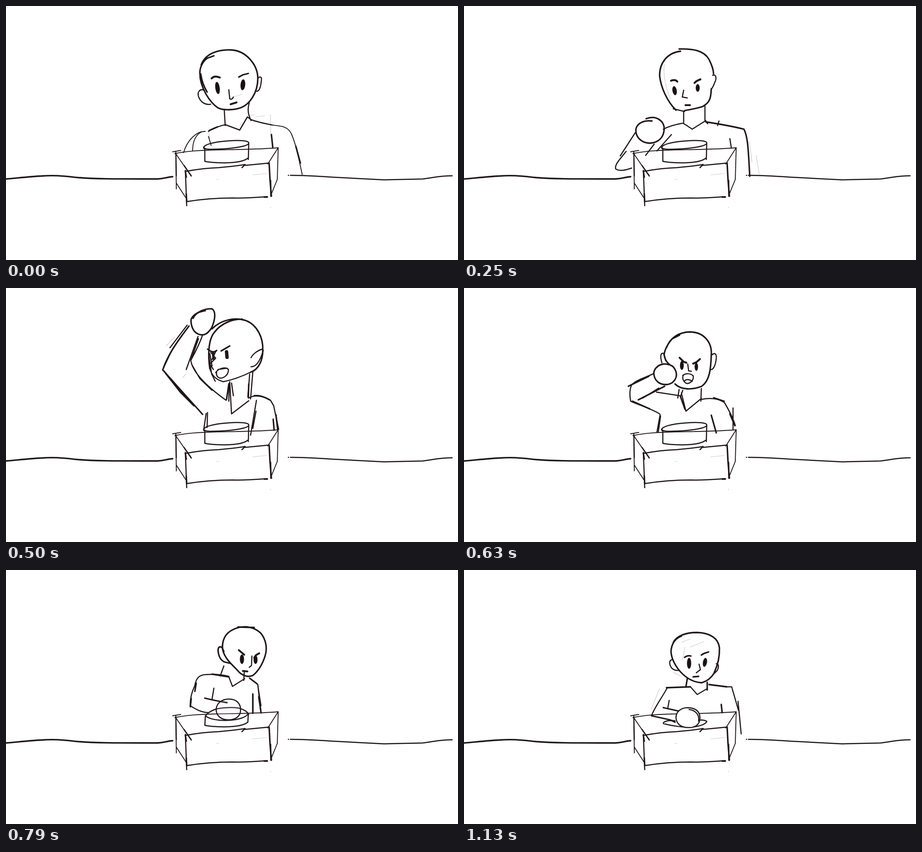
Recreate the animation shown at these times as an HTML page. Size 998 px wide and 561 px high, loop 1.71 s.

```html
<!DOCTYPE html>
<html lang="en">
<head>
<meta charset="utf-8">
<title>Fist on the table</title>
<style>
html, body { margin: 0; width: 100%; height: 100%; overflow: hidden; background: #fff; }
svg { display: block; width: 998px; height: 561px; overflow: hidden; }
path { fill: none; stroke: #1f151a; stroke-width: 2.5; stroke-linecap: round; stroke-linejoin: round; }
.thin { stroke-width: 1.9; }
.bold { stroke-width: 3.3; }
.thick { stroke-width: 4.2; }
.faint { stroke-width: 1.2; opacity: .22; }
.fist { fill: #fff; }
.clear { fill: #e4e4f6; fill-opacity: .15; }
ellipse { fill: #1a1115; }
/* Poses lie side by side; the strip jumps from one to the next. */
.strip { animation: poses 1710ms step-end infinite; }
@keyframes poses {
  0% { transform: translateX(0); }
  7.6% { transform: translateX(-998px); }
  14.61% { transform: translateX(-1996px); }
  22.22% { transform: translateX(-2994px); }
  29.23% { transform: translateX(-3992px); }
  36.84% { transform: translateX(-4990px); }
  41.52% { transform: translateX(-5988px); }
  46.19% { transform: translateX(-6986px); }
  48.53% { transform: translateX(-7984px); }
  51.16% { transform: translateX(-8982px); }
  53.8% { transform: translateX(-9980px); }
  56.14% { transform: translateX(-10978px); }
  60.81% { transform: translateX(-11976px); }
  66.08%, 100% { transform: translateX(-12974px); }
}
</style>
</head>
<body>
<svg viewBox="0 0 998 561">
<defs>
  <g id="cake">
    <path d="M437 315C433 306 460 300 490 298C515 296 537 297 536 303C535 310 500 315 470 316C450 317 438 317 436 312M439 314V343M536 303L535 339M439 343C450 346 480 347 495 346C515 345 528 341 534 336"/>
  </g>
  <g id="squashed">
    <path d="M440 328C438 320 450 312 464 307C480 304 500 303 514 305C525 308 533 313 536 319M440 322C450 330 470 333 490 332C515 331 530 325 534 318M440 325L439 343C450 346 480 347 495 346C515 345 528 341 534 336L535 318"/>
  </g>
  <g id="flat">
    <path d="M466 333C450 331 440 335 440 339C460 345 490 348 500 347C520 346 535 340 536 334C530 331 523 331 518 332"/>
  </g>

  <g id="head-calm">
    <path class="bold" d="M431 130C440 105 468 96 496 97C530 98 556 130 556 160C556 195 535 218 520 224C505 230 480 231 468 225C450 213 428 180 428 148C428 138 432 124 445 115L459 110M430 150C432 166 437 178 444 190"/>
    <path d="M438 186C428 182 422 190 425 200C430 213 440 219 452 217M556 160C560 155 565 156 564 163C563 175 560 190 553 188M492 185L494 205C497 207 500 206 502 201"/>
    <path class="thick" d="M454 160C458 155 465 155 472 158M496 217L509 213"/>
    <path class="bold" d="M514 157L523 152L535 149"/>
    <ellipse cx="467" cy="181" rx="4.9" ry="13.5" transform="rotate(-8 467 181)"/>
    <ellipse cx="523" cy="174" rx="5.2" ry="12" transform="rotate(5 523 174)"/>
  </g>
  <g id="head-stern">
    <path class="bold" d="M478 100C450 103 431 125 432 155C435 180 448 210 468 230M487 231C504 228 515 226 527 222C545 212 545 200 546 183M551 150C551 140 547 130 541 118C530 98 505 94 475 95"/>
    <path d="M549 153C557 150 558 160 554 168C551 176 549 180 546 184M485 186L482 201L493 203M462 227L487 233"/>
    <path class="faint" d="M442 128C440 150 443 175 456 205"/>
    <path class="thick" d="M457 165C463 163 468 163 471 167M509 170C514 164 518 164 522 162M489 219H499"/>
    <ellipse cx="465" cy="187" rx="4.8" ry="10" transform="rotate(-10 465 187)"/>
    <ellipse cx="516" cy="181" rx="4.4" ry="8.5"/>
  </g>
  <g id="head-shout">
    <path class="bold" d="M455 90C475 70 505 64 530 72C555 82 568 110 567 137C567 160 558 180 540 186M450 178C446 150 446 115 460 98C475 78 500 68 522 69"/>
    <path d="M542 185C522 195 500 203 480 207C465 203 455 195 450 178M566 135C555 138 545 146 541 154M541 174C552 174 560 164 568 138M462 156L450 168L458 180M448 150L454 190L462 206M463 187C470 176 485 174 491 180C492 192 480 200 472 199C466 197 464 192 465 186M468 180L488 177M452 142L463 155M464 138L455 158M450 145L455 172"/>
    <path class="bold" d="M445 135C455 142 460 143 465 138M475 139L494 128"/>
    <path d="M487 141L488 153" style="stroke-width:7.5"/>
    <path d="M457 142L458 156" style="stroke-width:5"/>
  </g>
  <g id="head-low">
    <path class="bold" d="M478 170C478 150 488 135 510 128C530 122 550 127 563 140C575 155 577 175 572 190C565 212 555 225 545 233C535 237 525 235 515 226C505 214 495 207 487 195C480 185 477 175 478 165M512 126L548 127"/>
    <path class="bold" d="M481 180L477 171C469 167 467 174 469 184C471 194 475 200 482 203L494 206"/>
    <path d="M543 190L542 211L537 215"/>
    <path class="thick" d="M514 177L526 187M548 194L552 188L559 184M523 223L533 224"/>
    <ellipse cx="521" cy="197" rx="4.6" ry="10.5"/>
    <ellipse cx="551" cy="198" rx="4.4" ry="9.5"/>
  </g>
  <g id="head-eased">
    <path class="bold" d="M497 150C510 140 530 136 548 138C575 142 590 160 588 182C585 200 572 212 562 222C550 235 543 243 533 244C520 240 510 225 497 205C488 190 482 178 483 165C485 155 495 147 510 144"/>
    <path d="M486 185C480 195 482 205 490 212L498 214M543 197L541 220L535 221"/>
    <path class="bold" d="M518 191C522 186 527 186 531 190M552 191L565 187M526 227L534 231"/>
    <ellipse cx="525" cy="205" rx="4.4" ry="9.5" transform="rotate(8 525 205)"/>
    <ellipse cx="556" cy="205" rx="4.2" ry="8.5" transform="rotate(8 556 205)"/>
  </g>
  <g id="head-still">
    <path class="bold" d="M462 160C470 145 490 138 515 138C545 139 562 152 564 172C565 195 558 215 552 228C545 240 535 246 525 249C505 248 490 238 478 225C465 210 458 195 457 180C458 165 465 152 480 146"/>
    <path d="M461 198C452 198 453 208 458 216C463 222 470 222 475 222M557 207C563 207 563 215 559 222L550 231M519 208L522 220L513 227"/>
    <path class="bold" d="M487 193C492 189 497 189 501 190M524 188C530 183 535 183 540 181M506 236L518 235"/>
    <ellipse cx="497" cy="206" rx="4.7" ry="12"/>
    <ellipse cx="532" cy="204" rx="4.5" ry="10" transform="rotate(10 532 204)"/>
  </g>

  <g id="body-stern">
    <path d="M485 233V260M532 221V253L538 260M484 259L504 272L534 253M482 259C465 262 450 267 440 272M560 264L563 254M587 293L590 312"/>
    <path class="bold" d="M534 256C560 260 590 265 618 272C628 290 628 330 631 376"/>
    <path class="faint" d="M630 300L636 345M645 330L652 372"/>
  </g>
  <g id="body-shout">
    <path d="M493 210L492 250M498 210L502 238M538 190L534 240M545 185L540 245M494 207L498 278L536 249M536 243C550 234 570 240 584 248L591 260L602 312M553 248L540 325M552 272L545 310M442 277L437 310M445 275L444 308"/>
    <path class="bold" d="M590 290L592 314M596 280L600 313M492 212L487 246M536 212L535 242M548 238C560 236 572 241 582 247"/>
  </g>
  <g id="body-low">
    <path d="M481 212L473 234M526 226L525 244M492 236L500 257L527 240M538 239L556 253L560 290L563 316M545 273V317M556 255L563 300M492 235C475 230 455 230 440 231C428 232 420 237 417 255C410 270 406 285 407 300"/>
    <path class="bold" d="M420 250L417 268M409 284L407 302M545 275V315M558 280L563 314M455 230L492 236M538 239L554 251"/>
  </g>
  <g id="body-eased">
    <path class="bold" d="M501 219L499 240M435 246L500 244M538 248L562 250M565 263L576 306M433 298L457 299L484 306M436 246C425 270 415 290 412 312"/>
    <path d="M533 240V250M499 243L512 263L522 250L538 247M562 250L577 308M557 262L549 315M555 280L552 300M459 272C455 280 452 290 453 296M415 316C430 318 450 325 466 328"/>
    <path class="clear" d="M467 326C466 312 480 306 494 306C512 306 521 314 521 325C521 337 510 344 494 343C478 344 468 338 467 326Z"/>
  </g>
  <g id="body-still">
    <path class="bold" d="M493 240L490 258M537 248V265M447 260L500 258M541 253L580 258M568 297L570 315M440 304L476 312M414 322L455 331L466 336"/>
    <path d="M500 258L515 275L537 262M449 260C435 285 420 305 414 322M580 258L591 258L606 310M605 290L608 320L612 362M453 288L450 305"/>
    <path class="faint" d="M432 262L413 308"/>
    <path class="fist" d="M468 326C468 312 480 304 495 304C512 305 521 313 521 327C521 341 510 349 495 348C479 348 469 340 468 326Z"/>
    <path d="M497 308C512 310 520 320 518 334"/>
  </g>
</defs>

<!-- Table and box -->
<path class="bold" d="M0 382C25 380 50 377 78 375.5C110 373 130 376 160 379C200 382 240 382 300 382H335C350 381 355 378 368 377"/>
<path d="M628 374C660 374 690 376 720 378C760 380 800 382 835 384C870 383 895 383 920 382C945 379 955 375 985 375M623.5 374H624"/>
<path class="thin" d="M373 326C400 320 430 319 460 318C500 317 560 317 601 313M375 321L376 404M374 325L396 357L409 376M601 313L578 349M601 313L599 383L586 415M376 391L398 425M368 322L386 319"/>
<path d="M398 365C420 361 440 358 470 357C500 354 520 352 528 350L521 357M528 352L580 347M396 363L399 441M399 432C430 427 470 424 500 424C530 425 550 423 577 421M375 326L376 375M393 352L409 375"/>
<path class="bold" d="M581 347L583 385L586 420M396 365L398 378M570 422H577M398 415L399 432M584 385L585 420"/>
<path class="faint" d="M584 444V446M465 383H470M545 373L575 370"/>

<g class="strip">
  <g>
    <use href="#cake"/><use href="#head-calm"/>
    <path d="M482 231L484 264M537 214C532 232 536 242 541 253M484 262L516 274L533 245L541 251C560 258 575 260 588 263M484 262C470 266 455 270 447 277"/>
    <path class="thin" d="M588 263C608 265 622 266 630 282C640 305 645 330 654 372M440 277C420 276 400 297 392 324M432 278C418 285 412 300 412 320M447 288L453 308"/>
    <path class="bold" d="M449 275L467 267M586 284L589 312M640 310L650 347"/>
    <path class="faint" d="M538 243L548 240M553 245L572 242M584 240V282M447 272L450 300M505 200L522 195"/>
  </g>

  <g transform="translate(998)">
    <use href="#cake"/><use href="#head-stern" y="3"/><use href="#body-stern"/>
    <path d="M440 272C405 276 370 300 335 344M428 312C400 325 375 348 336 372"/>
    <path class="fist bold" d="M278 346C290 332 318 332 331 348C338 366 328 388 308 393C286 396 266 382 267 364C268 356 272 350 278 346Z"/>
  </g>

  <g transform="translate(1996)">
    <use href="#cake"/><use href="#head-stern"/><use href="#body-stern"/>
    <path d="M378 280L345 331M358 321C345 338 332 350 335 360C345 366 358 362 370 358M458 284L426 320M420 305L401 330"/>
    <path class="bold" d="M402 249C425 240 443 255 442 272C441 290 430 302 410 303C390 302 377 288 380 270C384 258 398 252 415 254"/>
  </g>

  <g transform="translate(2994)">
    <use href="#cake"/><use href="#head-shout" x="-6" y="12"/><use href="#body-shout"/>
    <path d="M358 173C342 195 326 222 318 255C350 276 395 283 434 288M388 177C380 195 372 212 370 224C405 232 445 238 486 250"/>
    <path class="fist bold" d="M352 143C360 125 385 119 398 131C407 148 401 172 382 180C362 183 347 163 352 143Z"/>
  </g>

  <g transform="translate(3992)">
    <use href="#cake"/><use href="#head-shout"/><use href="#body-shout"/>
    <path class="bold" d="M413 67C420 52 440 45 455 46C464 52 462 70 454 88C445 102 437 106 425 102C412 97 407 80 409 68C415 58 425 52 440 50M404 84C385 110 360 140 346 181L434 279M352 188L385 230L415 260"/>
    <path d="M349 183L385 228L415 258M362 132L400 82M348 176L366 138M434 104C425 130 413 150 408 160C412 185 440 215 486 248M424 107L398 180M425 112L408 160M412 172L428 200L455 226"/>
    <path class="faint" d="M354 128L372 108M390 198L397 190M360 150L390 105M362 196L395 236"/>
  </g>

  <g transform="translate(4990)">
    <use href="#cake"/>
    <path class="bold" d="M447 132C455 110 475 97 500 97C530 98 548 120 546 148C545 180 542 205 525 217C505 225 480 226 466 212M476 104L460 112C448 125 442 140 442 148C444 158 447 164 455 170"/>
    <path d="M437 165C432 150 435 141 441 145L445 160M547 148C553 142 558 145 557 155C556 168 551 182 544 180M494 168L496 183L502 184M483 193C490 188 500 188 506 194C508 203 500 211 492 211C485 208 481 200 484 193M487 205C492 200 500 203 504 206"/>
    <path class="thick" d="M476 154L485 163L491 165M506 167L513 164L521 157"/>
    <ellipse cx="481" cy="171" rx="4.2" ry="10"/>
    <ellipse cx="513" cy="174" rx="3.8" ry="9"/>
    <path d="M419 189C400 198 380 203 370 214C365 225 366 240 368 250C390 260 410 265 432 278M430 221L395 243M425 230L477 238M475 224L472 243M483 226L478 240M433 280L426 318M434 283L429 318M480 232L490 272L524 244M524 222L523 250M524 246C545 242 560 244 575 253C588 275 595 290 599 304M551 242L575 250M594 265V312"/>
    <path class="bold" d="M363 217L408 195M372 250L410 267M443 217L385 247M478 240L488 268M546 281L557 320M587 278L598 304"/>
    <path class="fist bold" d="M426 175C435 164 460 166 466 180C474 195 465 210 450 213C432 215 420 205 419 188C420 178 428 170 440 168"/>
  </g>

  <g transform="translate(5988)">
    <use href="#cake"/><use href="#head-low" x="-12" y="-12"/><use href="#body-low"/>
    <path d="M407 300C425 300 440 294 457 285M430 270L455 262"/>
    <path class="fist bold" d="M453 268C453 252 465 243 479 243C496 244 505 255 504 269C503 284 493 292 478 291C463 290 454 282 453 268Z"/>
  </g>

  <g transform="translate(6986)">
    <use href="#squashed"/><use href="#head-low"/><use href="#body-low"/>
    <path d="M407 300C420 308 430 314 446 315M459 261L455 285"/>
    <path class="bold" d="M439 283C455 287 470 290 488 293"/>
    <path class="clear" d="M464 308C465 293 478 285 492 285C509 285 518 295 518 309C518 323 507 331 491 331C475 331 464 322 464 308Z"/>
  </g>

  <g transform="translate(7984)">
    <use href="#flat"/><use href="#head-low" x="6" y="9"/><use href="#body-eased"/>
  </g>
  <g transform="translate(8982)">
    <use href="#flat"/><use href="#head-eased" y="7"/><use href="#body-eased"/>
  </g>
  <g transform="translate(9980)">
    <use href="#flat"/><use href="#head-eased" y="3"/><use href="#body-eased"/>
  </g>
  <g transform="translate(10978)">
    <use href="#flat"/><use href="#head-eased"/><use href="#body-eased"/>
  </g>

  <g transform="translate(11976)">
    <use href="#flat"/><use href="#head-still" x="11" y="1"/><use href="#body-still"/>
  </g>
  <g transform="translate(12974)">
    <use href="#flat"/><use href="#head-still"/><use href="#body-still"/>
    <path class="faint" d="M480 160L500 152M488 170L482 200M462 226L478 234M500 170L530 158"/>
  </g>
</g>
</svg>
</body>
</html>
```
